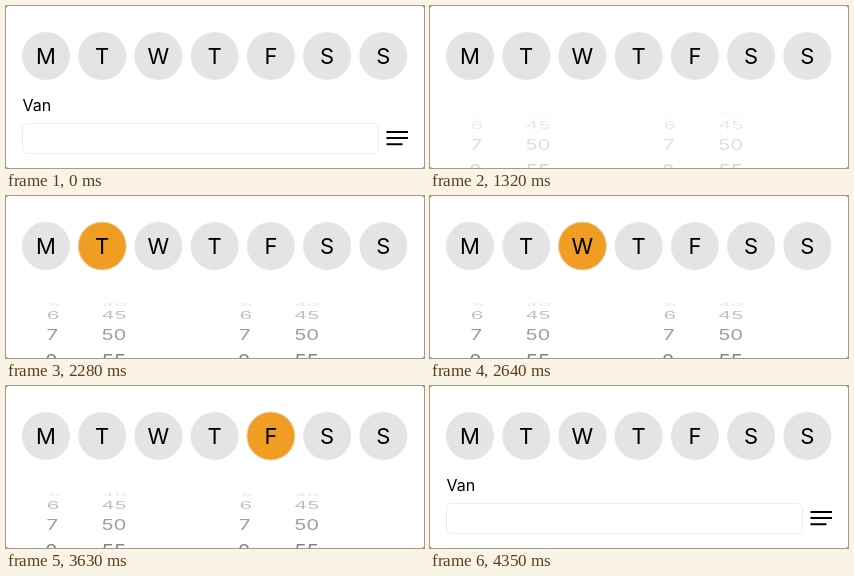
Write an HTML page that moves like this. It is 418x162 px and loops after 4860 ms.

```html
<!DOCTYPE html>
<html lang="nl">
<head>
<meta charset="utf-8">
<title>Day and time picker</title>
<style>
  html, body { margin: 0; width: 100%; height: 100%; overflow: hidden; background: #777; }
  svg { display: block; width: 418px; height: 162px; background: #fff; border-radius: 2.5px; }
  text { font-family: Inter, Roboto, sans-serif; }
  #days text { font-size: 22px; text-anchor: middle; }
  #days circle { fill: #e5e3e5; }
  #days circle.on { fill: #f09d23; stroke: #ecd2a8; }
  #picker text { font-size: 20.5px; text-anchor: middle; }
</style>
</head>
<body>
<svg viewBox="0 0 418 162">
  <defs>
    <clipPath id="reveal"><rect id="window" y="107" width="418"/></clipPath>
  </defs>
  <g id="days"></g>
  <g id="picker" clip-path="url(#reveal)"></g>
  <g id="form">
    <text x="16.5" y="105" font-size="16">Van</text>
    <rect x="16.5" y="117.5" width="356" height="30" rx="5" fill="#fff" stroke="#ededed"/>
    <path d="M380.5 126H402M380.5 132H402M380.5 138.3H396.5" stroke="#000" stroke-width="2"/>
  </g>
</svg>
<script>
const LOOP = 4860, STEP = 30, DROP = 75;
const $ = id => document.getElementById(id);

function add(parent, tag, attrs, text) {
  const el = document.createElementNS('http://www.w3.org/2000/svg', tag);
  for (const key in attrs) el.setAttribute(key, attrs[key]);
  if (text !== undefined) el.textContent = text;
  return parent.appendChild(el);
}

const circles = [...'MTWTFSS'].map((letter, i) => {
  const x = 40 + i * 56.22;
  const circle = add($('days'), 'circle', { cx: x, cy: 50, r: 24 });
  add($('days'), 'text', { x, y: 58 }, letter);
  return circle;
});

// Rows sit on a cylinder, 17 degrees apart, and flatten towards its top
for (let i = 0; i < 4; i++) {
  const angle = (79 - 17 * i) * Math.PI / 180;
  const squash = Math.cos(angle);
  const y = 216.8 - 110 * Math.sin(angle) + 7.45 * squash;
  const hourX = 49 - 4 * squash;
  const put = (label, x) => add($('picker'), 'text', {
    transform: `translate(${x} ${y}) scale(1 ${squash})`, 'fill-opacity': 0.55 * squash
  }, label);
  for (const shift of [0, 192.7]) {
    put(5 + i, hourX + shift);
    put(40 + 5 * i, 108 + shift);
  }
}

// Each visit: days picked in turn, then the moments the panel moves
const visits = [
  { picks: [[630, 0]], open: 690, close: 1290, back: 1530 },
  { picks: [[2010, 1], [2640, 2], [3090, 3], [3630, 4]], open: 2150, close: 4080, back: 4260 }
];

const progress = (t, start, length) => Math.min(1, Math.max(0, (t - start) / length));

function draw(t) {
  const visit = visits.findLast(v => t >= v.picks[0][0]) || visits[0];
  const pick = visit.picks.findLast(p => t >= p[0]);
  const day = pick && t < visit.close ? pick[1] : -1;
  const opened = progress(t, visit.open, 90);
  const faded = progress(t, visit.close - STEP, 90);
  const returned = progress(t, visit.back, 60);
  const drop = DROP * opened ** 2 * (1 - returned) ** 3;

  circles.forEach((c, i) => c.classList.toggle('on', i === day));
  $('form').setAttribute('transform', `translate(0 ${drop})`);
  $('picker').setAttribute('opacity', opened * (1 - faded));
  $('window').setAttribute('height', Math.max(0, drop - 18));
}

const begin = performance.now();
function tick() {
  const t = (performance.now() - begin) % LOOP;
  draw(Math.floor(t / STEP) * STEP);
  requestAnimationFrame(tick);
}
tick();
</script>
</body>
</html>
```
